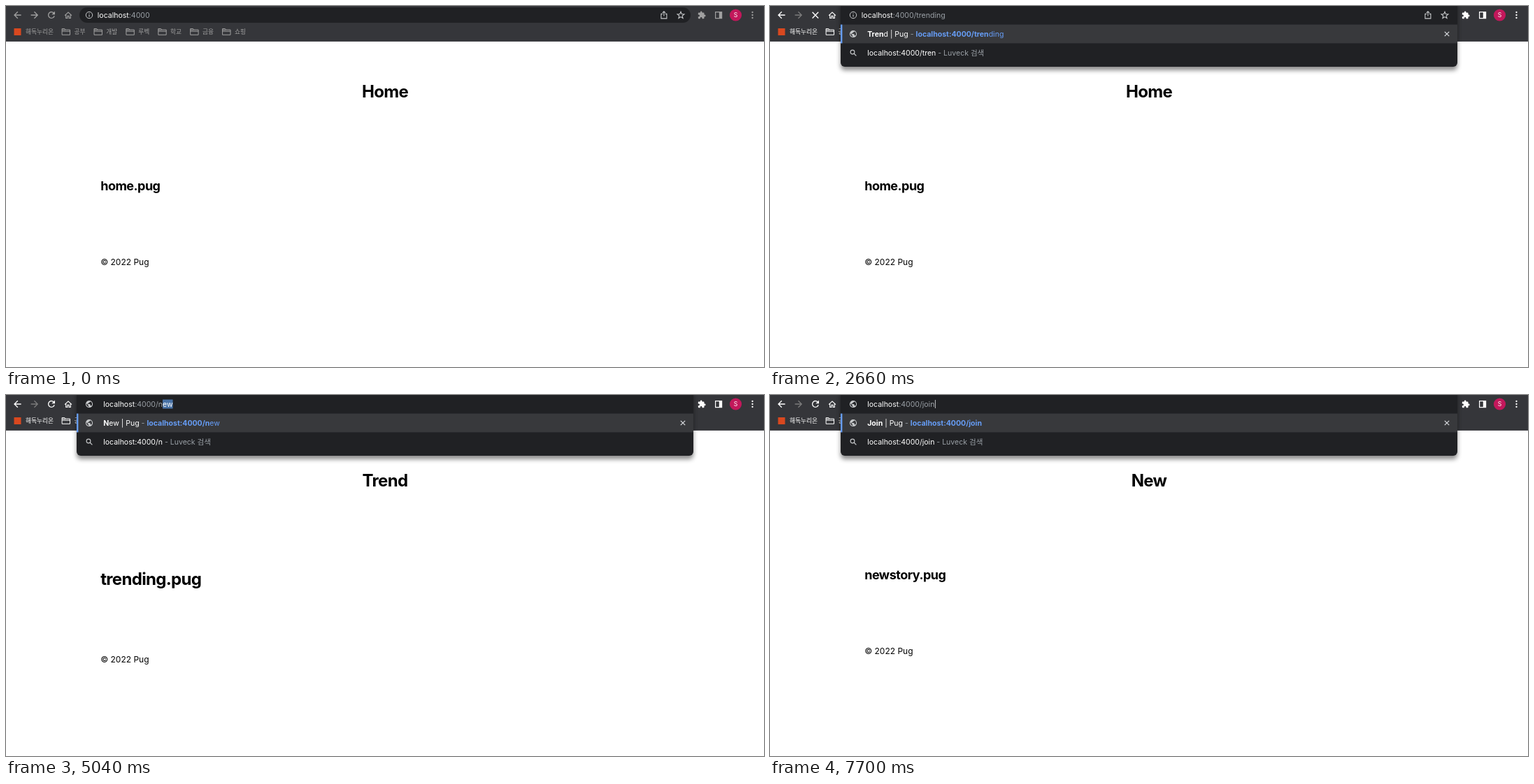
Write an HTML page that moves like this. It is 1084 by 517 pixels and loops after 8000 ms.

```html
<!DOCTYPE html>
<html lang="ko">
<head>
<meta charset="utf-8">
<title>Pug pages</title>
<style>
html, body { margin: 0; width: 100%; height: 100%; overflow: hidden; background: #fff; }
svg { display: block; width: 1084px; height: 517px; }
text { font: 10.54px Inter, 'Noto Sans CJK KR', 'Noto Sans CJK JP', sans-serif; font-optical-sizing: none; white-space: pre; }
.h1, .h2 { font-weight: 700; letter-spacing: -.028em; }
.h1 { font-size: 24px; }
.h2 { font-size: 18px; }
.foot { font-size: 12px; }
.mark { font: 8.7px 'Noto Sans CJK KR', 'Noto Sans CJK JP', sans-serif; }
.b { font-weight: 700; }
.dim { fill: #9aa0a6; }
.link { fill: #669df6; }
.line { fill: none; stroke-width: 1.3; }
#panel { filter: drop-shadow(0 5px 3px rgba(0, 0, 0, .45)); }
</style>
</head>
<body>
<svg viewBox="0 0 1084 517">
  <rect width="1084" height="517" fill="#fff"/>
  <g id="page"></g>
  <rect width="1084" height="51" fill="#35363a"/>
  <rect y="50.2" width="1084" height=".8" fill="#4a4c50"/>
  <rect x="105" y="2" width="874" height="22" rx="11" fill="#202124"/>
  <g id="bar"></g>
  <rect x="11.5" y="32" width="10" height="10" fill="#d9481f"/>
  <circle cx="1043.5" cy="13" r="8.6" fill="#c2185b"/>
  <text x="1043.5" y="16.2" text-anchor="middle" fill="#fff" style="font-size:8.6px">S</text>
  <g id="panel"></g>
  <rect id="ring" x="105.8" y="2.2" width="872.4" height="21.6" rx="10.8" fill="none" stroke="#669df6" stroke-width="1.7"/>
  <g id="lead"></g>
  <rect id="sel" y="6.5" height="13" fill="#4872a6"/>
  <text id="url" y="16.8"></text>
  <rect id="caret" y="7" width=".9" height="12" fill="#d0d2d4"/>
</svg>
<script>
const $ = id => document.getElementById(id);
const LOOP = 8000, STEP = 70, HOST = 'localhost:4000';

const PAGES = {
  home: { title: 'Home', body: 'home.pug', cls: 'h2', path: '/' },
  trend: { title: 'Trend', body: 'trending.pug', cls: 'h1', path: '/trending' },
  fresh: { title: 'New', body: 'newstory.pug', cls: 'h2', path: '/new' },
  join: { title: 'Join', path: '/join' }
};

// Each entry changes part of the state from its time on.
const EVENTS = [
  [0, { page: 'home', path: '', mode: 'rest', from: null, caret: false, open: '', load: false, focus: false }],
  [630, { focus: true, from: 0 }],
  [1120, { from: null, caret: true }],
  [1680, { open: 'all', mode: 'edit', path: '/', focus: false }],
  ...typing('trend', [1960, 2100, 2240, 2310]),
  ...visit('trend', 2660, 2730, 2870),
  ...reopen(3430, 3920, 4480),
  ...typing('fresh', [5040, 5180, 5250]),
  ...visit('fresh', 5460, 5530, 5600),
  ...reopen(6020, 6510, 7000),
  ...typing('join', [7210, 7420, 7560, 7700])
];

function typing(hit, times) {
  const path = PAGES[hit].path;
  return times.map((t, i) => {
    const done = i + 2 >= path.length;
    return [t, { open: 'one', hit, typed: i + 1, path, from: done ? null : HOST.length + i + 2, caret: done }];
  });
}
function visit(page, enter, shut, show) {
  return [[enter, { mode: 'rest', load: true, from: null, caret: false }],
    [shut, { open: '' }], [show, { page, load: false }]];
}
function reopen(all, part, clear) {
  return [[all, { focus: true, from: 0 }], [part, { from: HOST.length + 1 }],
    [clear, { open: 'all', mode: 'edit', path: '/', from: null, caret: true, focus: false }]];
}

const ramp = (t, start, n) => Math.max(0, Math.min(1, ((t - start) / STEP + 1) / n));
const grey = v => `rgb(${[v, v, v].map(Math.round)})`;
const text = (x, y, s, attr = 'fill="#fff"') => `<text x="${x}" y="${y}" ${attr}>${s}</text>`;
const span = (s, cls) => s ? `<tspan class="${cls}">${s}</tspan>` : '';
const stroke = (d, c, w = 1.3) => `<path class="line" d="${d}" stroke="${c}" style="stroke-width:${w}"/>`;
const at = (x, y, s, k = 1) => `<g transform="translate(${x} ${y}) scale(${k})">${s}</g>`;

const globe = (x, y) => at(x - 6.1, y - 6.1, '<path fill="#c8cacc" d="M12 2a10 10 0 1 0 0 20 10 10 0 0 0 0-20zm-1 17.9A8 8 0 0 1 4.2 10.2L9 15v1a2 2 0 0 0 2 2zm6.9-2.5A2 2 0 0 0 16 16h-1v-3a1 1 0 0 0-1-1H8v-2h2a1 1 0 0 0 1-1V7h2a2 2 0 0 0 2-2v-.4a8 8 0 0 1 2.9 12.8z"/>', .51);
const lens = (x, y) => stroke(`M${x + 1} ${y + 1}l3.4 3.4`, '#c8cacc', 1.2) +
  `<circle class="line" cx="${x - 1}" cy="${y - 1}" r="2.9" stroke="#c8cacc" style="stroke-width:1.1"/>`;
const star = () => 'M' + Array.from({ length: 10 }, (_, i) => {
  const r = i % 2 ? 2.3 : 5.2, a = i * Math.PI / 5;
  return `${965 + r * Math.sin(a)} ${13.3 - r * Math.cos(a)}`;
}).join('L') + 'z';

const MARKS = ['공부', '개발', '루벡', '학교', '금융', '쇼핑'];

function drawBar(on, load) {
  const c = grey(160 + 95 * on), fwd = grey(160 - 36 * on), label = `class="mark" fill="${c}"`;
  const folder = stroke('M.5.5h3.8l1.3 1.6h6.3v7.2H.5zM.5 4.2h11.4M.5 2.3h5', c, 1);
  const out = [
    stroke('M21.6 13H12M16.8 8.2L12 13l4.8 4.8', c),
    stroke('M35.6 13h9.6M40.4 8.2l4.8 4.8-4.8 4.8', fwd),
    load ? stroke('M60.6 8.8l8.6 8.6M69.2 8.8l-8.6 8.6', c, 1.4)
      : stroke('M68.6 10.4A4.4 4.4 0 1 0 69.2 14.2', c) + `<path d="M70 7.6v4.6h-4.6z" fill="${c}"/>`,
    stroke('M84 13.6L89 9l5 4.6M85.7 12.4v5h2.2v-3h2.2v3h2.2v-5', c, 1.1),
    at(988.8, 7, `<path fill="${c}" d="M20.5 11H19V7a2 2 0 0 0-2-2h-4V3.5a2.5 2.5 0 0 0-5 0V5H4a2 2 0 0 0-2 2v3.8h1.5a2.7 2.7 0 0 1 0 5.4H2V20a2 2 0 0 0 2 2h3.8v-1.5a2.7 2.7 0 0 1 5.4 0V22H17a2 2 0 0 0 2-2v-4h1.5a2.5 2.5 0 0 0 0-5z"/>`, .51),
    stroke('M1014.6 8.6h9v9h-9z', c, 1.2),
    `<path d="M1019.8 8.6h4v9h-4z" fill="${c}"/>`,
    ...[9, 13, 17].map(y => `<circle cx="1067.5" cy="${y}" r="1.15" fill="${c}"/>`),
    text(28, 40, '해독누리온', label),
    ...MARKS.map((m, i) => at(79.6 + 45.9 * i, 32, folder) + text(97.4 + 45.9 * i, 40, m, label))
  ];
  $('bar').innerHTML = out.join('');
}

function drawPage(id) {
  const p = PAGES[id], low = p.cls === 'h1';
  $('page').innerHTML = text(542, 130.8, p.title, 'class="h1" text-anchor="middle"') +
    text(135.2, low ? 272 : 264, p.body, `class="${p.cls}"`) +
    text(135.2, low ? 383 : 371.2, '© 2022 Pug', 'class="foot"');
}

function link(path, n) {
  return span(' - ', 'dim') + span(HOST + path.slice(0, n), 'link b') + span(path.slice(n), 'link');
}
function hitRow(id, n) {
  const p = PAGES[id];
  return span(p.title.slice(0, n), 'b') + p.title.slice(n) + ' | Pug' + link(p.path, n + 1);
}
const plainRow = path => span(HOST + '/', 'b') + path.slice(1) + link(path, 1);
const findRow = path => HOST + path + span(' - Luveck 검색', 'dim');

function drawPanel(s, alpha) {
  const g = $('panel');
  g.style.opacity = alpha;
  if (!s.open) { g.innerHTML = ''; return; }
  const rows = s.open === 'one'
    ? [[hitRow(s.hit, s.typed)], [findRow(PAGES[s.hit].path.slice(0, s.typed + 1)), 'find']]
    : [[hitRow('home', 0), 'home'], [findRow('/'), 'find'], [plainRow('/login')], [hitRow('trend', 0), 'trend'],
      [hitRow('join', 0)], [plainRow('/protected')], [hitRow('fresh', 0), 'fresh']];
  let y = 40, out = '';
  for (const [label, kind] of rows) {
    out += (kind === 'find' ? lens : globe)(119, y) + text(139.2, y + 3.8, label);
    if (kind === s.page) {
      out += stroke(`M151 ${y + 20.8}h-3.5v8.4h8v-5.4M152 ${y + 20.8}h3.5v3.2`, '#fff', 1.1) +
        text(163, y + 28.8, '이 탭으로 전환', 'class="b" fill="#fff"');
      y += 29;
    }
    y += 27;
  }
  g.innerHTML = `<rect x="101" y="-10" width="882" height="${y + 3}" rx="6" fill="#202124"/>` +
    '<rect x="101" y="26.6" width="882" height="26.8" fill="#38393c"/>' +
    '<rect x="101" y="26.6" width="2.4" height="26.8" fill="#669df6"/>' +
    stroke('M964.8 36.8l6.4 6.4M971.2 36.8l-6.4 6.4', '#dadce0', 1.2) + out;
}

function drawUrl(s) {
  const full = HOST + s.path, rest = s.mode === 'rest', x = rest ? 130.8 : 139.2;
  const from = s.from ?? full.length, url = $('url');
  const cut = Math.max(9, from);
  url.setAttribute('x', x);
  url.setAttribute('fill', '#fff');
  url.innerHTML = from ? full.slice(0, 9) + span(full.slice(9, cut), 'dim') + full.slice(cut) : full;
  const width = n => n ? url.getSubStringLength(0, n) : 0;
  const end = width(full.length), start = width(from);
  $('sel').setAttribute('x', x + start);
  $('sel').setAttribute('width', Math.max(0, end - start));
  $('caret').setAttribute('x', x + end + .5);
  $('caret').style.opacity = s.caret ? 1 : 0;
  const c = '#c8cacc';
  $('lead').innerHTML = rest
    ? `<circle class="line" cx="119" cy="13" r="4.7" stroke="${c}" style="stroke-width:1"/>` +
      stroke('M119 12.4v3.2M119 10.2v1.1', c, 1.1) +
      stroke('M938.9 11.4h-2v6.5h8v-6.5h-2M940.9 14.6V8M938.7 9.9l2.2-2.2 2.2 2.2', c, 1.1) + stroke(star(), c, 1.1)
    : globe(119, 13);
}

function draw(t) {
  const s = {};
  let focusAt = 0, openAt = 0;
  for (const [time, change] of EVENTS) {
    if (time > t) break;
    if (change.focus) focusAt = time;
    if (change.open === 'all') openAt = time;
    Object.assign(s, change);
  }
  const first = openAt === 1680;
  drawPage(s.page);
  drawBar(ramp(t, 70, 6), s.load);
  drawPanel(s, s.open === 'all' ? ramp(t, openAt, first ? 3 : 2) ** 1.8 : 1);
  $('ring').style.opacity = s.focus ? ramp(t, focusAt, focusAt === 3430 ? 3 : 2) : 0;
  if (s.mode === 'edit' || s.load) $('ring').style.opacity = 0;
  drawUrl(s);
}

// Focus ends once the address is left, so the ring only shows on a resting bar.
let last = -1;
function tick(now) {
  const t = Math.floor((now % LOOP) / STEP) * STEP;
  if (t !== last) draw(last = t);
  requestAnimationFrame(tick);
}
draw(0);
requestAnimationFrame(tick);
</script>
</body>
</html>
```
